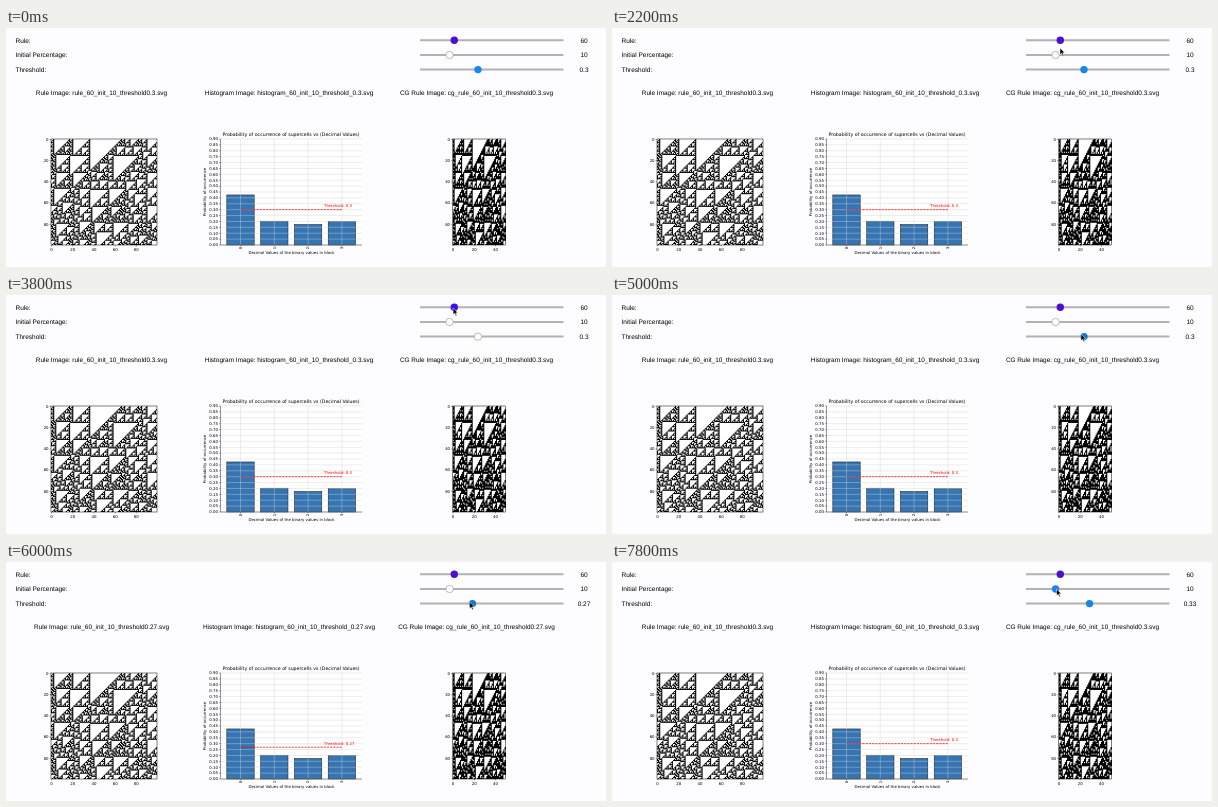
An HTML page with a canvas that plays this animation: 600 px wide and 239 px high, repeating every 8000 ms.

```html
<!DOCTYPE html>
<html lang="en">
<head>
<meta charset="utf-8">
<title>Cellular automaton explorer</title>
<style>
  html, body { margin: 0; width: 100%; height: 100%; overflow: hidden; background: #fdfcfe; }
  canvas { display: block; }
</style>
</head>
<body>
<canvas id="stage" width="600" height="239"></canvas>
<script>
const ctx = document.getElementById('stage').getContext('2d');
const LOOP = 8000, STEP = 200, SIZE = 100, CELL = 1.06;
const SANS = '"Liberation Sans", Arial, sans-serif';
const PLOT = '"DejaVu Sans", sans-serif';
const TOP = 111, BOTTOM = 217;
const BLUE = '#1a84f0', PURPLE = '#4a0fd0', GRID = '#d2d2d2';

// Each cell becomes the XOR of itself and its right neighbour.
// Seeds roughly 16 apart keep wide triangles in every band of 16 rows.
function automaton() {
  const seeds = [2, 17, 20, 36, 66, 69, 74, 82, 85, 90];
  const rows = [Array.from({ length: SIZE }, (_, x) => +seeds.includes(x))];
  while (rows.length < SIZE) {
    const last = rows[rows.length - 1];
    rows.push(last.map((c, x) => c ^ last[(x + 1) % SIZE]));
  }
  return rows;
}

function bitmap(rows) {
  const image = document.createElement('canvas');
  image.width = rows[0].length;
  image.height = rows.length;
  const c = image.getContext('2d');
  rows.forEach((row, y) => row.forEach((on, x) => {
    c.fillStyle = on ? '#000' : '#fff';
    c.fillRect(x, y, 1, 1);
  }));
  return image;
}

const fine = automaton();
const coarse = fine.map(row => row.filter((_, x) => x % 2 === 0).map((c, i) => c | row[2 * i + 1]));
const fineImage = bitmap(fine), coarseImage = bitmap(coarse);

function text(s, x, y, size, { font = SANS, align = 'center', color = '#000', turn = 0 } = {}) {
  ctx.save();
  ctx.translate(x, y);
  ctx.rotate(turn);
  ctx.font = `${size}px ${font}`;
  ctx.textRendering = 'geometricPrecision';
  ctx.textAlign = align;
  ctx.fillStyle = color;
  ctx.fillText(s, 0, size * 0.35);
  ctx.restore();
}

function line(x1, y1, x2, y2, color = '#000', width = 0.4) {
  ctx.strokeStyle = color;
  ctx.lineWidth = width;
  ctx.beginPath();
  ctx.moveTo(x1, y1);
  ctx.lineTo(x2, y2);
  ctx.stroke();
}

function cellPlot(image, left) {
  const width = image.width * CELL;
  ctx.drawImage(image, left, TOP, width, BOTTOM - TOP);
  ctx.strokeStyle = '#000';
  ctx.lineWidth = 0.5;
  ctx.strokeRect(left, TOP, width, BOTTOM - TOP);
  for (let v = 0; v < SIZE; v += 20) {
    const d = (v + 0.5) * CELL;
    line(left - 1.4, TOP + d, left, TOP + d);
    text(v, left - 2.4, TOP + d, 3.9, { font: PLOT, align: 'right' });
    if (v >= image.width) continue;
    line(left + d, BOTTOM, left + d, BOTTOM + 1.4);
    text(v, left + d, BOTTOM + 4.2, 3.9, { font: PLOT });
  }
}

function histogram(threshold) {
  const left = 214.5, right = 356, pitch = 33.8, first = 234.5;
  const yOf = p => BOTTOM - p / 0.9 * (BOTTOM - TOP);
  ctx.fillStyle = '#fff';
  ctx.fillRect(left, TOP, right - left, BOTTOM - TOP);
  [0.425, 0.202, 0.174, 0.199].forEach((p, i) => {
    const box = [first + i * pitch - 13.7, yOf(p), 27.4, BOTTOM - yOf(p)];
    ctx.fillStyle = '#3575b3';
    ctx.fillRect(...box);
    ctx.strokeStyle = '#111';
    ctx.lineWidth = 0.5;
    ctx.strokeRect(...box);
  });
  for (let i = 0; i <= 18; i++) {
    const y = yOf(i * 0.05);
    line(left, y, right, y, GRID);
    line(left - 1.4, y, left, y);
    text((i * 0.05).toFixed(2), left - 2.6, y, 3.9, { font: PLOT, align: 'right' });
  }
  for (let i = 0; i < 4; i++) {
    const x = first + i * pitch;
    line(x, TOP, x, BOTTOM, GRID);
    line(x, BOTTOM, x, BOTTOM + 1.4);
    text(i, x, BOTTOM + 3.1, 3.9, { font: PLOT, turn: -Math.PI / 2 });
  }
  line(left, TOP, left, BOTTOM, '#333', 0.5);
  line(left, BOTTOM, right, BOTTOM, '#333', 0.5);
  const y = yOf(threshold);
  ctx.setLineDash([2.2, 1]);
  line(first, y, first + 3 * pitch, y, '#f00', 0.75);
  ctx.setLineDash([]);
  text(`Threshold: ${threshold}`, 318, y - 3.6, 3.9, { font: PLOT, align: 'left', color: '#f00' });
  text('Probability of occurrence of supercells vs (Decimal Values)', 285, 106.3, 4.7, { font: PLOT });
  text('Decimal Values of the binary values in block', 285.5, 225, 3.9, { font: PLOT });
  text('Probability of occurrence', 198.5, 164, 3.9, { font: PLOT, turn: -Math.PI / 2 });
}

function slider(label, y, x, value, color) {
  text(label, 9.5, y, 6.5, { align: 'left' });
  line(414, y, 557.5, y, '#b2b2b2', 2);
  ctx.beginPath();
  ctx.arc(x, y, 3.7, 0, 2 * Math.PI);
  ctx.fillStyle = color;
  ctx.fill();
  if (color === '#fff') {
    ctx.strokeStyle = '#a0a0a0';
    ctx.lineWidth = 0.7;
    ctx.stroke();
  }
  text(value, 578, y, 6.5);
}

function pointer([x, y]) {
  ctx.save();
  ctx.translate(x, y);
  ctx.fillStyle = '#000';
  ctx.strokeStyle = '#fff';
  ctx.lineWidth = 0.5;
  const shape = new Path2D('M0 0V6.6L1.6 5.2L2.7 7.7L3.8 7.2L2.7 4.8H4.8Z');
  ctx.fill(shape);
  ctx.stroke(shape);
  ctx.restore();
}

// Pointer path: time, x, y
const path = [
  [1800, 451, 36], [2200, 448, 20], [2800, 446.5, 15], [3000, 447, 13], [4400, 447.2, 13],
  [5000, 469, 39], [5200, 469, 40], [5400, 463.6, 40], [6600, 463.6, 40],
  [6800, 475, 40], [7200, 443.5, 27.5], [7800, 444.5, 27]
];

function pointerAt(t) {
  const i = path.findIndex(k => k[0] > t);
  if (i === 0) return null;
  if (i < 0) return path[path.length - 1].slice(1);
  const [a, b] = [path[i - 1], path[i]];
  const f = (t - a[0]) / (b[0] - a[0]);
  return [1, 2].map(j => a[j] + (b[j] - a[j]) * f);
}

function draw(now) {
  const t = Math.floor(now % LOOP / STEP) * STEP;
  const threshold = t < 5400 ? 0.3 : t < 6800 ? 0.27 : 0.33;
  const shown = t >= 5800 && t < 7600 ? 0.27 : 0.3;
  const overRule = t >= 3000 && t < 4600;
  const overThreshold = t >= 5000 && t < 7000;
  const thresholdColor = t >= 3800 && t < 4800 ? '#fff' : overThreshold ? '#1277d8' : BLUE;

  ctx.fillStyle = '#fdfcfe';
  ctx.fillRect(0, 0, 600, 239);
  slider('Rule:', 12.3, 448.3, 60, overRule ? '#3d10f0' : PURPLE);
  slider('Initial Percentage:', 27, 443.6, 10, t >= 7200 ? BLUE : '#fff');
  slider('Threshold:', 41.6, 472 + (threshold - 0.3) * 185, threshold, thresholdColor);

  text(`Rule Image: rule_60_init_10_threshold${shown}.svg`, 95.5, 65, 6.45);
  text(`Histogram Image: histogram_60_init_10_threshold_${shown}.svg`, 283, 65, 6.45);
  text(`CG Rule Image: cg_rule_60_init_10_threshold${shown}.svg`, 470.5, 65, 6.45);

  cellPlot(fineImage, 45);
  histogram(shown);
  cellPlot(coarseImage, 446.5);
  const at = pointerAt(t);
  if (at) pointer(at);
  requestAnimationFrame(() => draw(performance.now()));
}
draw(0);
</script>
</body>
</html>
```
